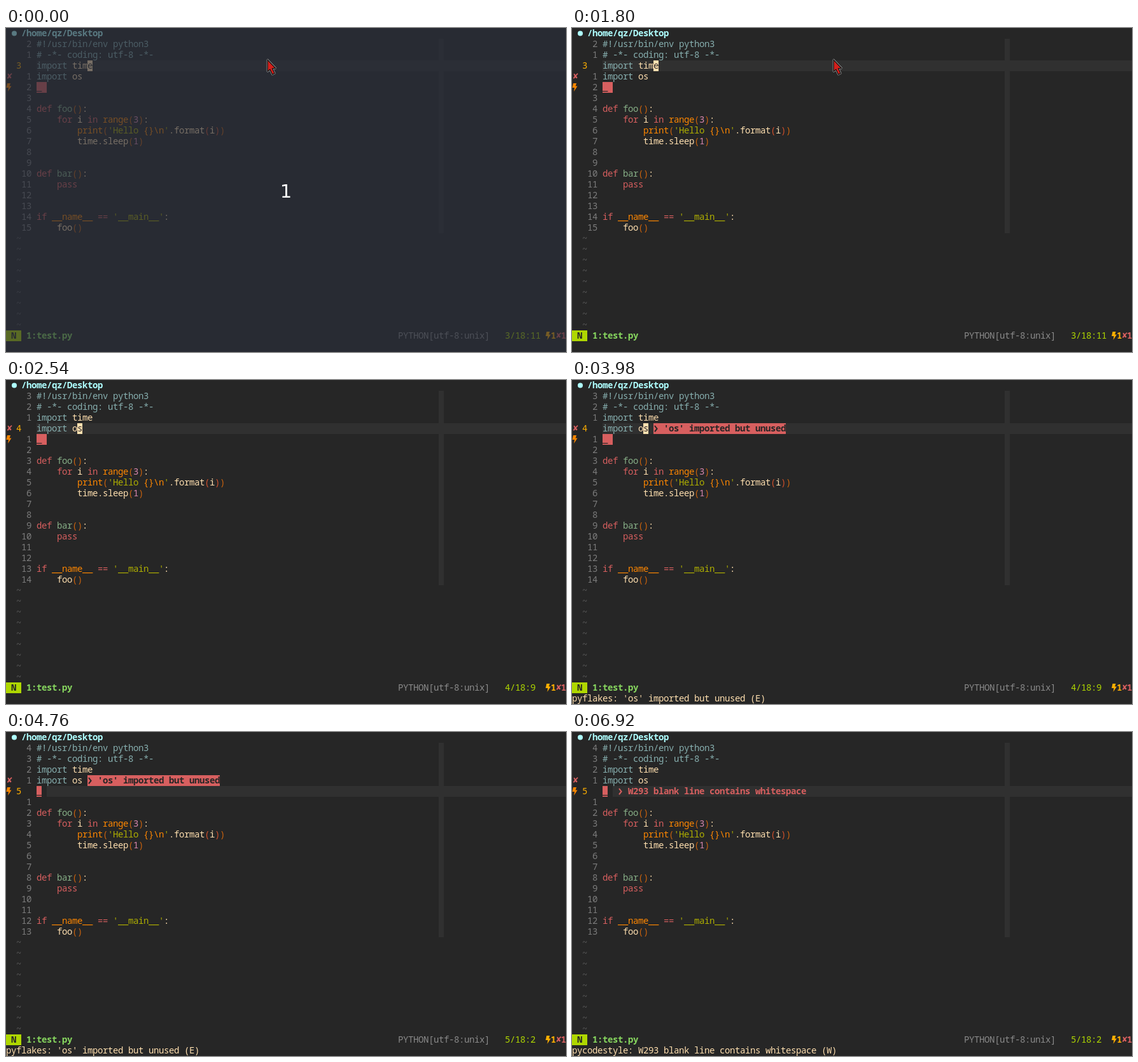
Recreate the animation shown at these times as an HTML page. Size 880 by 510 pixels, loop 8000 ms.

```html
<!DOCTYPE html>
<html lang="en">
<head>
<meta charset="utf-8">
<title>Editor lint messages</title>
<style>
  html, body { margin: 0; width: 100%; height: 100%; overflow: hidden; background: #262626; }
  svg { display: block; width: 880px; height: 510px; }
  text { font: 14px "Noto Sans Mono", "DejaVu Sans Mono", monospace; letter-spacing: -0.4px; white-space: pre; }
  .bold { font-weight: 700; }
  .cross { font: 12px "DejaVu Sans", sans-serif; letter-spacing: 0; }
  .count { font: 29px "DejaVu Sans", sans-serif; letter-spacing: 0; text-anchor: middle; }
</style>
</head>
<body>
<svg id="stage" viewBox="0 0 880 510"></svg>
<script>
const CW = 8, CH = 17, LOOP = 8000;
const C = {
  bg: '#262626', line: '#303030', fg: '#ffdfaf', red: '#d75f5f', orange: '#ff8700',
  blue: '#87afaf', aqua: '#87af87', lime: '#afaf00', pink: '#d787af', paren: '#c8620e',
  inner: '#d0502c', amber: '#ffaf00', num: '#7c7c7c', tilde: '#585858', mode: '#afd700',
  file: '#87d75f', info: '#8a8a8a', title: '#afffff'
};

// Each line: text, colour, text, colour ...
const code = [
  ['#!/usr/bin/env python3', 'blue'],
  ['# -*- coding: utf-8 -*-', 'blue'],
  ['import', 'blue', ' time', 'fg'],
  ['import', 'blue', ' os', 'fg'],
  [], [],
  ['def', 'red', ' foo', 'aqua', '()', 'paren', ':', 'fg'],
  ['    for', 'red', ' i', 'fg', ' in', 'red', ' range', 'orange', '(', 'paren', '3', 'pink', ')', 'paren', ':', 'fg'],
  ['        print', 'orange', '(', 'paren', "'Hello ", 'lime', '{}\\n', 'orange', "'", 'lime',
    '.format', 'fg', '(', 'inner', 'i', 'fg', ')', 'inner', ')', 'paren'],
  ['        time.sleep', 'fg', '(', 'paren', '1', 'pink', ')', 'paren'],
  [], [],
  ['def', 'red', ' bar', 'aqua', '()', 'paren', ':', 'fg'],
  ['    pass', 'red'],
  [], [],
  ['if', 'red', ' __name__', 'orange', ' ==', 'red', " '__main__'", 'lime', ':', 'fg'],
  ['    foo', 'fg', '()', 'paren']
];

const unused = "'os' imported but unused";
const blank = 'W293 blank line contains whitespace';
const onOs = { row: 4, col: 14, char: 's', pos: '4/18:9' };
const onBlank = { row: 5, col: 7, char: '', pos: '5/18:2' };
const onTime = { row: 3, col: 16, char: 'e', pos: '3/18:11', mouse: true };
const steps = [
  { at: 0, ...onTime, count: '1' },
  { at: 700, ...onTime },
  { at: 2540, ...onOs },
  { at: 2820, ...onOs, hint: 'os', msg: `pyflakes: ${unused} (E)` },
  { at: 4760, ...onBlank, hint: 'os', msg: `pyflakes: ${unused} (E)` },
  { at: 5300, ...onBlank, hint: 'blank', msg: `pycodestyle: ${blank} (W)` }
];

const stage = document.getElementById('stage');

function add(tag, attrs, content = '') {
  const el = document.createElementNS('http://www.w3.org/2000/svg', tag);
  for (const k in attrs) el.setAttribute(k, attrs[k]);
  el.textContent = content;
  stage.append(el);
}
const rect = (x, y, width, height, fill) => add('rect', { x, y, width, height, fill });
const cells = (col, row, n, color) => rect(col * CW, row * CH, n * CW, CH, C[color]);
const put = (col, row, str, color, cls = '') =>
  add('text', { x: col * CW, y: row * CH + 13, fill: C[color], class: cls }, str);
const path = (d, attrs) => add('path', { d, ...attrs });
const bolt = (x, y, color) => path(`M${x + 2} ${y}h5l-1.5 4.5h3l-5.5 8.5 1-6h-3.5z`, { fill: C[color] });
const cross = (x, y, color) => add('text', { x, y, fill: C[color], class: 'cross' }, '✘');

function hint(col, row, str, color) {
  path(`M${col * CW + 2} ${row * CH + 4}l3.6 4.7-3.6 4.7`, { fill: 'none', stroke: C[color], 'stroke-width': 2 });
  put(col + 2, row, str, color, 'bold');
}

function drawCode(s) {
  rect(680, CH, CW, 18 * CH, C.line);
  cells(6, s.row, 104, 'line');
  code.forEach((runs, i) => {
    const row = i + 1, gap = Math.abs(row - s.row);
    if (gap) put(5 - String(gap).length, row, gap, 'num');
    else put(2, row, row, 'amber');
    let col = 6;
    for (let k = 0; k < runs.length; k += 2) {
      const str = runs[k], lead = str.length - str.trimStart().length;
      put(col + lead, row, str.trimStart(), runs[k + 1]);
      col += str.length;
    }
  });
  for (let row = 19; row < 28; row++) put(2, row, '~', 'tilde');
  cross(0.5, 80, 'red');
  bolt(0, 87, 'orange');
  cells(6, 5, 2, 'red');
  put(6, 5, '_', 'bg');
  cells(s.col, s.row, 1, s.char ? 'fg' : 'bg');
  put(s.col, s.row, s.char, 'bg');
  if (s.hint === 'os') {
    cells(16, 4, 26, 'red');
    hint(16, 4, unused, 'bg');
  }
  if (s.hint === 'blank') hint(9, 5, blank, 'red');
}

function drawStatus(s) {
  cells(0, 28, 3, 'mode');
  put(1, 28, 'N', 'bg', 'bold');
  put(4, 28, '1:test.py', 'file', 'bold');
  put(77, 28, 'PYTHON[utf-8:unix]', 'info');
  put(98, 28, s.pos, 'mode');
  bolt(847.5, 478, 'amber');
  put(107, 28, '1', 'amber', 'bold');
  cross(863.5, 488, 'red');
  put(109, 28, '1', 'red', 'bold');
  if (s.msg) put(0, 29, s.msg, 'fg');
}

function drawMouse() {
  const d = 'M411 50V68.5L414.8 65.4 418.6 73.2 422.2 71.4 418.6 63.8 423.5 63.2Z';
  path(d, { fill: 'none', stroke: '#b8b8b8', 'stroke-width': 2.6, 'stroke-linejoin': 'round' });
  path(d, { fill: '#d3201c', stroke: '#161616', 'stroke-width': 1.4 });
}

function draw(s) {
  stage.replaceChildren();
  rect(0, 0, 880, 510, C.bg);
  add('circle', { cx: 13, cy: 8.5, r: 4, fill: C.title });
  put(3, 0, '/home/qz/Desktop', 'title', 'bold');
  drawCode(s);
  drawStatus(s);
  if (s.count) {
    rect(0, 0, 880, 510, 'rgba(41,46,58,.64)');
    add('text', { x: 440, y: 267, fill: '#fff', class: 'count' }, s.count);
  }
  if (s.mouse) drawMouse();
}

const start = performance.now();
let shown;
function tick() {
  const t = (performance.now() - start) % LOOP;
  const s = steps.findLast(step => step.at <= t);
  if (s !== shown) draw(shown = s);
  requestAnimationFrame(tick);
}
tick();
</script>
</body>
</html>
```
